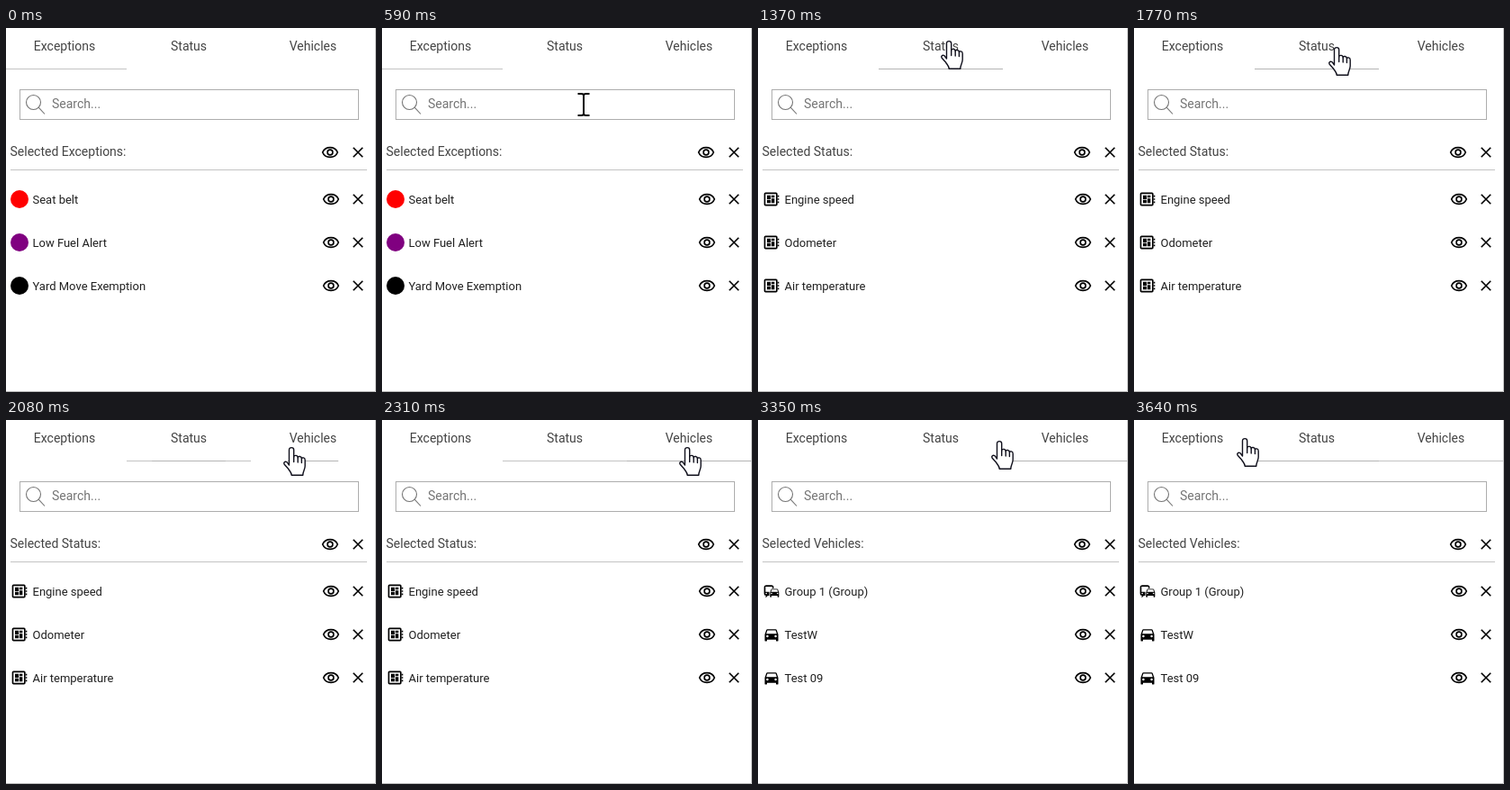
Animation, 411 px wide and 404 px high, one loop 3.72 s. Source, as an HTML page:

```html
<!DOCTYPE html>
<html lang="en">
<head>
<meta charset="utf-8">
<title>Selection panel</title>
<style>
  html, body { margin: 0; width: 100%; height: 100%; overflow: hidden; background: #fff; }
  svg { display: block; width: 411px; height: 404px; }
  text { font: 14px Roboto, Arial, sans-serif; fill: #444; }
  .tab { text-anchor: middle; }
  .row { font-size: 13px; fill: #212121; }
  .stroke { fill: none; stroke: #000; stroke-width: 2; }
</style>
</head>
<body>
<svg viewBox="0 0 411 404">
  <defs>
    <g id="eye" class="stroke">
      <path d="M2 11.5C3.7 7.5 7.6 5 12 5s8.3 2.5 10 6.5C20.3 15.5 16.4 18 12 18S3.7 15.5 2 11.5z"/>
      <circle cx="12" cy="11.5" r="3.5"/>
    </g>
    <path id="close" class="stroke" d="M5.7 5.7L18.3 18.3M18.3 5.7L5.7 18.3"/>
    <g id="board">
      <rect class="stroke" x="3" y="4" width="16" height="16" rx="1"/>
      <path d="M20 7h2v2h-2zM20 11h2v2h-2zM20 15h2v2h-2zM6 13h5v4H6zM12 7h4v3h-4zM6 7h5v5H6zM12 11h4v6h-4z"/>
    </g>
    <path id="car" fill-rule="evenodd" d="M18.92 6C18.72 5.4 18.16 5 17.5 5h-11c-.66 0-1.2.4-1.42 1L3 12v8q0 1 1 1h1q1 0 1-1v-1h12v1q0 1 1 1h1q1 0 1-1v-8zM5 14.5a1.5 1.5 0 1 0 3 0a1.5 1.5 0 1 0-3 0zM16 14.5a1.5 1.5 0 1 0 3 0a1.5 1.5 0 1 0-3 0zM5 11l1.5-4.5h11L19 11z"/>
    <g id="fleet">
      <path fill-rule="evenodd" d="M12 4H5a3 3 0 0 0-3 3v8a3 3 0 0 0 3 3l-1 1v1h1l2-2h2v-5H4V6h9v2h2V7a3 3 0 0 0-3-3zM4 15a1 1 0 1 0 2 0a1 1 0 1 0-2 0z"/>
      <path fill-rule="evenodd" d="M20.57 9.66Q20.3 9 19.6 9h-7.2q-.7 0-.97.66L10 13.8v5.5q0 .7.7.7h.6q.7 0 .7-.76V18h8v1.24q0 .76.7.76h.6q.7 0 .7-.7v-5.5zM12.4 10h7.2l1.03 3h-9.25zM11 15a1 1 0 1 0 2 0a1 1 0 1 0-2 0zM19 15a1 1 0 1 0 2 0a1 1 0 1 0-2 0z"/>
    </g>
    <g id="hand" fill="#fff" stroke="#10101c" stroke-width="1.4" stroke-linejoin="round" stroke-linecap="round">
      <path d="M-2.5 20V3.2a2.6 2.6 0 0 1 5.2 0V11c0-2.3 4.5-2.3 4.5.8c.3-2 4.2-1.7 4.2 1c.4-1.6 3.8-1.2 3.8 1.6V21c0 4-2.4 5.5-2.4 10.3H.2c0-3-2-4.5-3.5-7L-7.8 19.3C-9.2 17.3-7 15.3-5 16.7z"/>
      <path d="M2.7 11v5.5M7.2 12v5M11.4 13v4.5"/>
    </g>
    <path id="beam" class="stroke" d="M-6.5-12h4q2.5 0 2.5 2V10q0 2-2.5 2h-4M6.5-12h-4q-2.5 0-2.5 2M6.5 12h-4q-2.5 0-2.5-2"/>
    <path id="arrow" fill="#fff" stroke="#000" stroke-width="1.2" d="M.6 1V24l5.4-5.2 3.4 8 3.6-1.5-3.4-7.8H17z"/>
  </defs>

  <rect width="411" height="404" fill="#fff"/>
  <path d="M410.5 0V403.5H0" fill="none" stroke="#bdbdbd"/>
  <g id="tabs"></g>
  <rect x="15.5" y="68.5" width="376" height="33" fill="#fff" stroke="#adadad"/>
  <g fill="none" stroke="#757575" stroke-width="1.1">
    <circle cx="30.5" cy="82.5" r="8"/><path d="M36.2 88.2L43 95.5"/>
  </g>
  <text x="51" y="89" style="fill:#757575">Search...</text>
  <path d="M5 157.5H401" stroke="#c4c4c4"/>
  <g id="controls"></g>
  <g id="panels"></g>
  <circle id="click" r="18" fill="#ff0" fill-opacity=".47"/>
  <use id="cursor"/>
</svg>
<script>
const LOOP = 3720, HOVER_MS = 300, TAB_WIDTH = 138;
const $ = id => document.getElementById(id);

function add(parent, tag, attrs, text) {
  const node = document.createElementNS('http://www.w3.org/2000/svg', tag);
  for (const key in attrs) node.setAttribute(key, attrs[key]);
  if (text) node.textContent = text;
  return parent.appendChild(node);
}
const icon = (parent, name, cx, cy) =>
  add(parent, 'use', { href: '#' + name, transform: `translate(${cx - 10} ${cy - 10}) scale(${20 / 24})` });

// since: when the tab becomes active; hovers: [enter, leave] times
const tabs = [
  { name: 'Exceptions', since: 0, hovers: [],
    rows: [['red', 'Seat belt'], ['purple', 'Low Fuel Alert'], ['black', 'Yard Move Exemption']] },
  { name: 'Status', since: 1370, hovers: [[685, 2005], [3335, LOOP]],
    rows: [['board', 'Engine speed'], ['board', 'Odometer'], ['board', 'Air temperature']] },
  { name: 'Vehicles', since: 2860, hovers: [[2005, 3335]],
    rows: [['fleet', 'Group 1 (Group)'], ['car', 'TestW'], ['car', 'Test 09']] }
];

// time, hotspot x, y, shape
const track = [
  [0, 0, 0, ''],
  [210, 322, 384, 'arrow'], [290, 302, 310, 'arrow'], [360, 276, 232, 'arrow'],
  [440, 250, 165, 'arrow'], [520, 231, 114, 'arrow'], [590, 224, 85, 'beam'],
  [670, 214, 38, 'hand'], [760, 213, 24, 'hand'], [830, 212, 17, 'hand'],
  [910, 212, 14, 'hand'], [990, 212, 14, 'hand'], [1300, 212, 14, 'hand'], [1370, 212, 14, 'hand'],
  [1600, 214, 16, 'hand'], [1680, 218, 18, 'hand'], [1750, 225, 21, 'hand'],
  [1830, 235, 24, 'hand'], [1910, 250, 27, 'hand'], [1990, 276, 30, 'hand'],
  [2080, 317, 30, 'hand'], [2160, 333, 30, 'hand'], [2230, 338, 30, 'hand'],
  [2310, 339, 30, 'hand'], [2710, 339, 30, 'hand'], [2860, 339, 30, 'hand'],
  [3180, 334, 31, 'hand'], [3260, 306, 28, 'hand'], [3330, 268, 23, 'hand'],
  [3410, 228, 18, 'hand'], [3490, 191, 16, 'hand'], [3560, 157, 17, 'hand'], [3640, 123, 20, 'hand']
];
const clicks = [1300, 2710];

tabs.forEach((tab, i) => {
  tab.center = 65 + TAB_WIDTH * i;
  add($('tabs'), 'text', { class: 'tab', x: tab.center, y: 25 }, tab.name);
  tab.activeLine = add($('tabs'), 'rect',
    { x: tab.center - 69, y: 45, width: TAB_WIDTH, height: 1, fill: '#c4c4c4' });
  tab.hoverLine = add($('tabs'), 'rect', { y: 45, height: 1, fill: '#b4b4b4' });
  tab.panel = add($('panels'), 'g', {});
  add(tab.panel, 'text', { x: 4.5, y: 142 }, `Selected ${tab.name}:`);
  tab.rows.forEach(([mark, label], r) => {
    const y = 190 + 48 * r;
    if (i) icon(tab.panel, mark, 15, y);
    else add(tab.panel, 'circle', { cx: 15, cy: y, r: 10, fill: mark });
    add(tab.panel, 'text', { class: 'row', x: 29.5, y: y + 5 }, label);
  });
});
[138, 190, 238, 286].forEach((y, i) => {
  icon($('controls'), 'eye', i ? 361 : 360, y + 0.4);
  icon($('controls'), 'close', 391, y);
});

// CSS "ease": cubic-bezier(.25, .1, .25, 1)
function ease(x) {
  if (x <= 0) return 0;
  if (x >= 1) return 1;
  const bezier = (a, b, s) => 3 * a * s * (1 - s) ** 2 + 3 * b * s * s * (1 - s) + s ** 3;
  let low = 0, high = 1;
  for (let i = 0; i < 24; i++) {
    const mid = (low + high) / 2;
    if (bezier(0.25, 0.25, mid) < x) low = mid; else high = mid;
  }
  return bezier(0.1, 1, low);
}
const hoverAmount = (hovers, t) => hovers.reduce((sum, [enter, leave]) =>
  sum + ease((t - enter) / HOVER_MS) - ease((t - leave) / HOVER_MS), 0);

function draw(now) {
  const clock = now % LOOP;
  const [t, x, y, shape] = track.filter(step => step[0] <= clock).pop();
  const active = tabs.filter(tab => tab.since <= t).pop();
  for (const tab of tabs) {
    const display = tab === active ? '' : 'none';
    tab.panel.style.display = tab.activeLine.style.display = display;
    const width = TAB_WIDTH * hoverAmount(tab.hovers, t);
    tab.hoverLine.setAttribute('x', tab.center - width / 2);
    tab.hoverLine.setAttribute('width', width);
  }
  const place = `translate(${x} ${y})`;
  $('cursor').setAttribute('href', '#' + shape);
  $('cursor').setAttribute('transform', place);
  $('cursor').style.display = shape ? '' : 'none';
  $('click').setAttribute('transform', place);
  $('click').style.display = clicks.includes(t) ? '' : 'none';
}

const start = performance.now();
function tick() {
  draw(performance.now() - start);
  requestAnimationFrame(tick);
}
tick();
</script>
</body>
</html>
```
